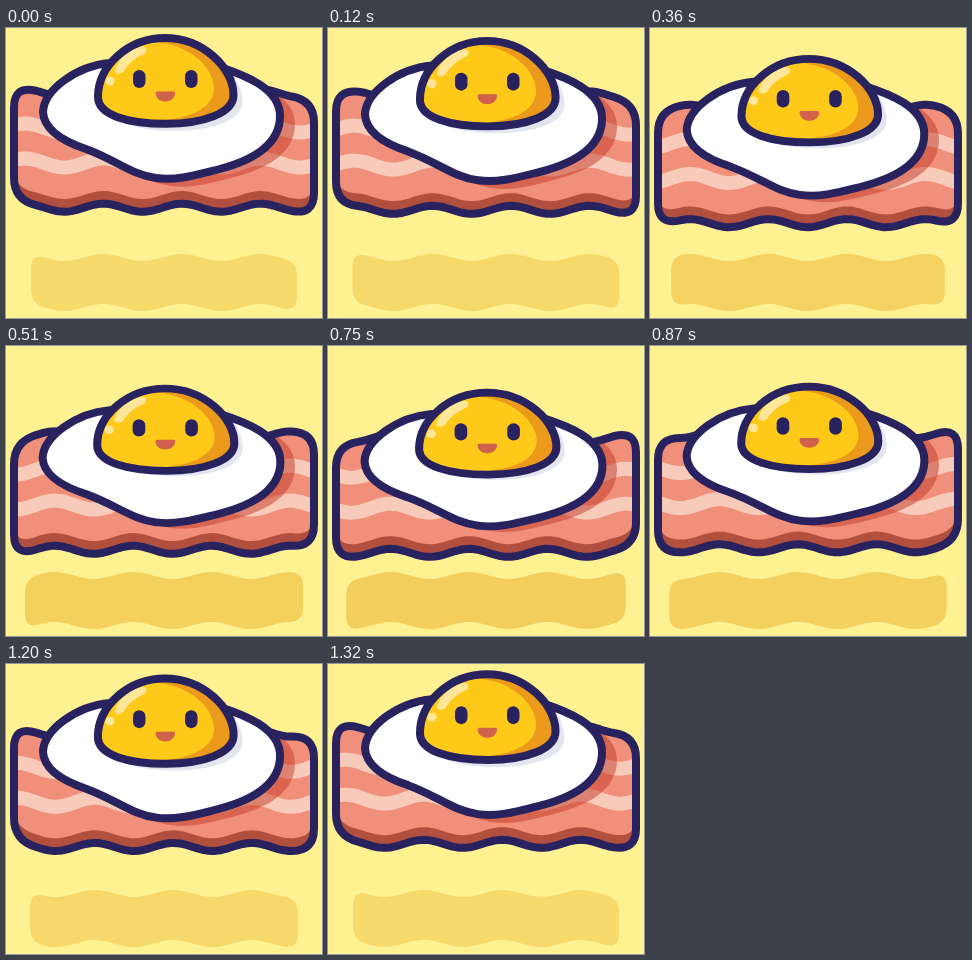
Recreate the animation shown at these times as an HTML page. Size 316x290 px, loop 1.35 s.

```html
<!DOCTYPE html>
<html lang="en">
<head>
<meta charset="utf-8">
<title>Egg on bacon</title>
<style>
  html, body { margin: 0; width: 100%; height: 100%; overflow: hidden; background: #fef192; }
  svg { display: block; width: 316px; height: 290px; }
  .line { stroke: #28225f; stroke-width: 8; stroke-linejoin: round; }
  .fat { fill: none; stroke: #f7cab9; stroke-width: 14; }
</style>
</head>
<body>
<svg viewBox="0 0 316 290">
  <defs>
    <path id="whiteShape" d="M37 84C38 62 70 38 104 35L214 39C238 47 274 60 274 88C274 118 245 133 212 141.500C190 147 170 153 150 150C126 147 110 132 80 121C56 113 38 102 37 84Z"/>
    <path id="yolkShape" d="M92 69C92 38 122 10 159 10C197 10 227.500 40 227.500 67C227.500 85 198 95.800 160 95.800C122 95.800 92 87 92 69Z"/>
    <clipPath id="inBacon"><path id="baconClip"/></clipPath>
    <clipPath id="inWhite"><use href="#whiteShape"/></clipPath>
    <clipPath id="inYolk"><use href="#yolkShape"/></clipPath>
  </defs>

  <path id="floor"/>

  <g id="bacon">
    <g clip-path="url(#inBacon)">
      <rect width="316" height="200" fill="#b2503f"/>
      <path id="meat" fill="#f0907a"/>
      <g clip-path="url(#inBacon)">
        <path id="fat1" class="fat"/>
        <path id="fat2" class="fat"/>
      </g>
      <use href="#whiteShape" x="15" y="8" fill="#c43c28" opacity=".5"/>
    </g>
    <path id="rind" class="line" fill="none"/>
  </g>

  <g id="white">
    <use href="#whiteShape" fill="#fff"/>
    <use href="#yolkShape" x="9" y="7" fill="#e3e6ef" clip-path="url(#inWhite)"/>
    <use href="#whiteShape" class="line" fill="none"/>
  </g>

  <g id="yolk">
    <use href="#yolkShape" fill="#ec9a1b"/>
    <g clip-path="url(#inYolk)">
      <path fill="#ffc919" d="M80 0H150V14C190 18 208 44 208 60C208 82 180 92 145 93L80 100Z"/>
      <path fill="#fee79a" d="M109 42C113 30 123 21 136 18.500C141 18 142 24 138 26C129 30 122 36 118 43C115 47 108 46 109 42Z"/>
      <circle cx="104" cy="53" r="4.500" fill="#fee79a"/>
    </g>
    <g fill="#28225f">
      <rect x="127" y="42" width="12.500" height="18" rx="6.250"/>
      <rect x="179" y="42" width="12.500" height="18" rx="6.250"/>
    </g>
    <path fill="#d0614a" d="M151 63.500H167.500Q169.500 63.500 169 66C168 71 164 73.500 159.300 73.500C154.500 73.500 150.500 71 149.700 66Q149.200 63.500 151 63.500Z"/>
    <use href="#yolkShape" class="line" fill="none"/>
  </g>
</svg>
<script>
  const LOOP = 1350, STEP = 30, WAVE = 78.5, K = 2 * Math.PI / WAVE;
  const $ = id => document.getElementById(id);
  const mix = (a, b, p) => a + (b - a) * p;
  const set = (id, name, value) => $(id).setAttribute(name, value);

  // Points along a wave that travels right by one wavelength per loop.
  function wave(x0, x1, y, amp, shift) {
    const n = 80, pts = [];
    for (let i = 0; i <= n; i++) {
      const x = mix(x0, x1, i / n);
      pts.push([x, y - amp * Math.cos(K * (x - 19 - shift))]);
    }
    return pts;
  }

  const join = pts => pts.map(p => p[0].toFixed(2) + ' ' + p[1].toFixed(2)).join('L');

  // Rounded slab with parallel wavy top and bottom edges.
  function slab(l, r, top, bottom, rad, amp, shift) {
    const slope = x => amp * K * Math.sin(K * (x - 19 - shift)) * rad;
    const up = wave(l + rad, r - rad, top, amp, shift);
    const down = wave(l + rad, r - rad, bottom, amp, shift).reverse();
    const dl = slope(l + rad), dr = slope(r - rad);
    const tr = up[up.length - 1][1] + dr, br = down[0][1] + dr;
    const bl = down[down.length - 1][1] - dl, tl = up[0][1] - dl;
    return `M${join(up)}Q${r} ${tr} ${r} ${tr + rad}L${r} ${br - rad}Q${r} ${br} ${join(down)}` +
      `Q${l} ${bl} ${l} ${bl - rad}L${l} ${tl + rad}Q${l} ${tl} ${join(up.slice(0, 1))}Z`;
  }

  // Drop by dy at the top edge and squash about x = 159.
  function squash(id, top, dy, sx, sy) {
    set(id, 'transform', `translate(159 ${top + dy}) scale(${sx} ${sy}) translate(-159 ${-top})`);
  }

  function draw(now) {
    const t = Math.floor(now % LOOP / STEP) * STEP / LOOP;
    const p = (1 - Math.cos(2 * Math.PI * t)) / 2;
    const shift = WAVE * t;

    const body = slab(8, 308, 65.3, 179.7, 22, 4, shift);
    set('baconClip', 'd', body);
    set('rind', 'd', body);
    set('meat', 'd', slab(8, 308, 40, 167, 20, 4, shift));
    set('fat1', 'd', 'M' + join(wave(0, 316, 100, 4.5, shift)));
    set('fat2', 'd', 'M' + join(wave(0, 316, 135, 4.5, shift)));
    set('bacon', 'transform', `translate(0 ${28 * p})`);

    squash('white', 31, 34 * p, mix(1, 1.004, p), mix(1, 0.971, p));
    squash('yolk', 6, 38 * p, mix(1, 1.014, p), mix(1, 0.953, p));

    set('floor', 'd', slab(mix(25, 18, p), mix(291, 298, p), 229.5, 279.5, 14, 3.5, shift));
    set('floor', 'fill', `rgb(${mix(246, 244, p)} ${mix(218, 206, p)} ${mix(108, 91, p)})`);
  }

  function tick() {
    draw(performance.now());
    requestAnimationFrame(tick);
  }
  tick();
</script>
</body>
</html>
```
